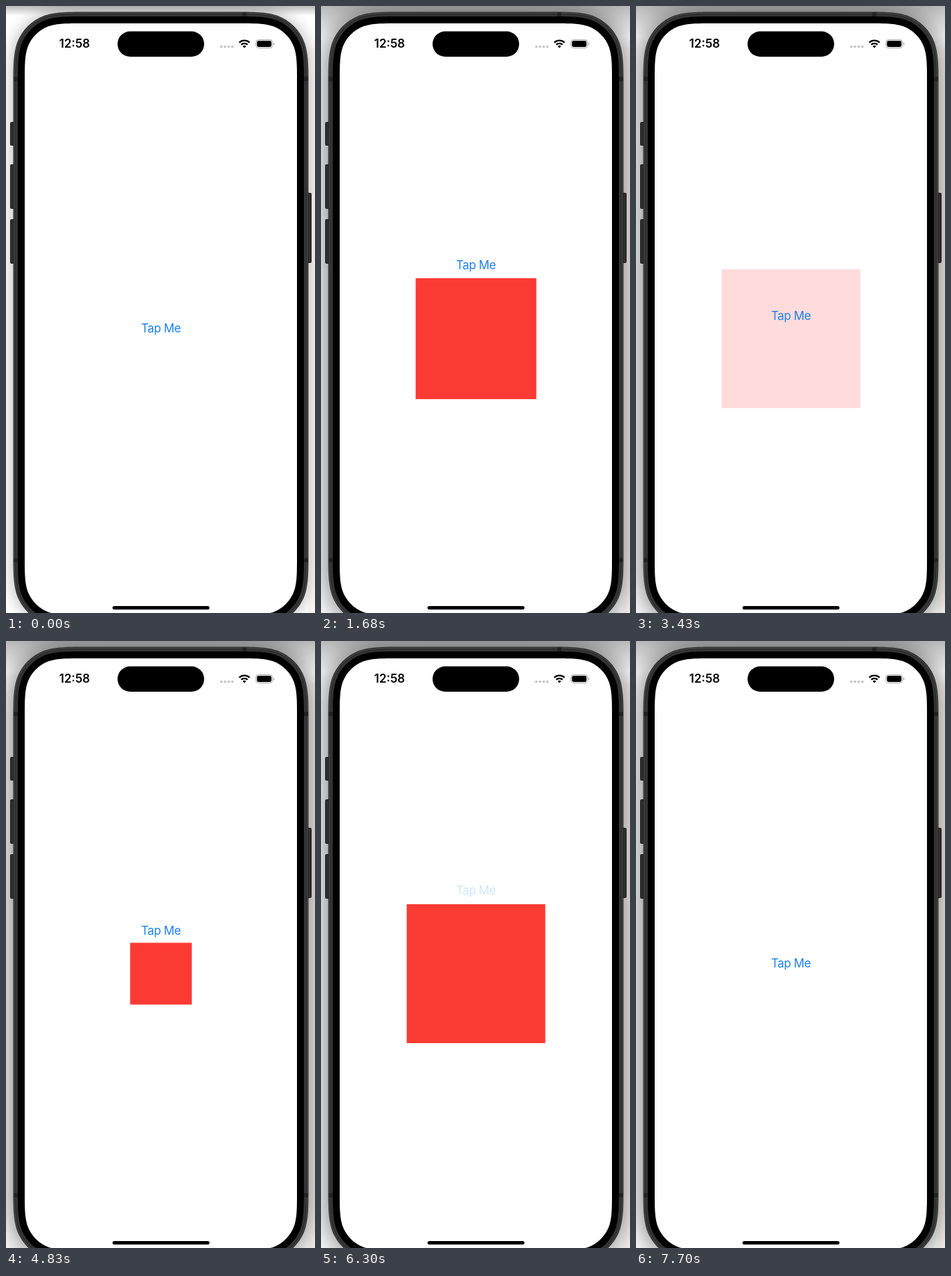
An HTML page for the animation above (8000 ms loop, 446 by 874 pixels).

```html
<!DOCTYPE html>
<html lang="en">
<head>
<meta charset="utf-8">
<title>Tap Me</title>
<style>
  html, body { margin: 0; width: 100%; height: 100%; overflow: hidden; background: #fff; }
  svg { display: block; width: 446px; height: 874px; }
  text { font-family: Inter, Roboto, sans-serif; font-size: 17px; text-anchor: middle; }
</style>
</head>
<body>
<svg viewBox="0 0 446 874">
  <defs>
    <filter id="soft" filterUnits="userSpaceOnUse" x="-100" y="-100" width="646" height="1120">
      <feGaussianBlur stdDeviation="12"/>
    </filter>
    <filter id="wide" filterUnits="userSpaceOnUse" x="-100" y="-100" width="646" height="1120">
      <feGaussianBlur stdDeviation="22"/>
    </filter>
    <linearGradient id="topShade" x2="0" y2="1">
      <stop offset="0" stop-color="#000" stop-opacity=".27"/>
      <stop offset="1" stop-color="#000" stop-opacity="0"/>
    </linearGradient>
  </defs>

  <rect width="446" height="874" fill="#fff"/>
  <g id="idleShade">
    <path data-inset="-16" opacity=".32" filter="url(#soft)"/>
    <rect width="446" height="14" fill="url(#topShade)"/>
  </g>
  <g id="focusShade">
    <path data-inset="-16" opacity=".6" filter="url(#wide)"/>
    <rect width="446" height="44" fill="url(#topShade)"/>
  </g>
  <rect x="436" y="60" width="10" height="814" fill="#c08f86" opacity=".07"/>

  <g id="buttons" fill="#303030" stroke="#161616"></g>

  <path data-inset="-16.5" fill="#1c1c1c"/>
  <path data-inset="-15" fill="#363636" stroke="#626262" stroke-width=".8"/>
  <path data-inset="-13.6" fill="#343434" stroke="#262626" stroke-width=".8"/>
  <g fill="#222">
    <rect x="11.5" y="102" width="6" height="6"/>
    <rect x="430" y="102" width="6" height="6"/>
    <rect x="11.5" y="795" width="6" height="6"/>
    <rect x="430" y="795" width="6" height="6"/>
    <rect x="341" y="9.5" width="6" height="6"/>
  </g>
  <path data-inset="-10"/>
  <path data-inset="0" fill="#fff"/>

  <text x="99" y="60.4" font-weight="600">12:58</text>
  <rect x="161" y="36.5" width="125" height="36.5" rx="18.25"/>
  <g fill="#c6c6c6">
    <circle cx="310.8" cy="58.6" r="1.9"/>
    <circle cx="316.1" cy="58.6" r="1.9"/>
    <circle cx="321.4" cy="58.6" r="1.9"/>
    <circle cx="326.7" cy="58.6" r="1.9"/>
  </g>
  <g fill="none" stroke="#000" stroke-width="2.3">
    <path d="M336.6 52.7A10.8 10.8 0 0 1 351.6 52.7"/>
    <path d="M339.5 55.7A6.7 6.7 0 0 1 348.7 55.7"/>
    <path d="M344.1 60.4L341.7 58A3.5 3.5 0 0 1 346.5 58Z" fill="#000" stroke="none"/>
  </g>
  <rect x="360.7" y="48.5" width="24" height="12" rx="3.8" fill="none" stroke="#a6a6a6"/>
  <rect x="362.2" y="50" width="21" height="9" rx="2.4"/>
  <path d="M386 52.5Q387.4 53 387.4 54.5T386 56.5Z" fill="#a6a6a6"/>

  <rect id="square" x="-100" y="-100" width="200" height="200" fill="#fc3a34"/>
  <text id="label" x="223.6" fill="#1f80ec" letter-spacing="-.4">Tap Me</text>
  <rect x="153.7" y="864" width="140" height="5" rx="2.5"/>
</svg>
<script>
const LOOP = 8000, FOCUS = 1260;
const REST_Y = 470, LIFT = 105;
const taps = [
  { press: 1260, release: 1369, show: true },
  { press: 3152, release: 3154, show: false },
  { press: 4620, release: 4699, show: true },
  { press: 6300, release: 6345, show: false }
];
const byId = id => document.getElementById(id);
const clamp = v => Math.max(0, Math.min(1, v));

// Screen outline grown by -inset, with continuous-curvature corners.
function outline(inset) {
  const x0 = 27 + inset, y0 = 25 + inset, x1 = 420 - inset, y1 = 877 - inset;
  const r = 55 - inset;
  const half = [[1.5287, 0], [1.0885, 0], [.8684, 0], [.6315, .0749], [.3728, .1691]];
  const corner = half.concat(half.map(([a, b]) => [b, a]).reverse());
  const place = (pts, fx, fy) => pts.map(([a, b]) =>
    `${fx ? x1 - a * r : x0 + a * r} ${fy ? y1 - b * r : y0 + b * r}`);
  const back = [...corner].reverse();
  return "M" + [place(back, 0, 0), place(corner, 1, 0), place(back, 1, 1), place(corner, 0, 1)]
    .map(p => `${p[0]}C${p.slice(1).join(" ")}`).join("L") + "Z";
}

document.querySelectorAll("[data-inset]").forEach(p =>
  p.setAttribute("d", outline(+p.dataset.inset)));

byId("buttons").innerHTML = [[6.5, 167.5, 33], [6.5, 228.5, 63], [6.5, 307.5, 63], [434.5, 269.5, 100]]
  .map(([x, y, h]) => `<rect x="${x}" y="${y}" width="6" height="${h}" rx="1"/>`).join("");

// Critically damped spring with a 0.55 s response.
function spring(ms) {
  const k = Math.max(0, ms) / 1000 * 2 * Math.PI / .55;
  return 1 - (1 + k) * Math.exp(-k);
}

function draw(t) {
  const tap = taps.filter(a => t >= a.press).pop();
  const since = tap ? t - tap.release : 0;
  const moved = tap ? spring(since) : 0;
  const open = !tap ? 0 : tap.show ? moved : 1 - moved;
  const scale = tap && !tap.show ? 1 : open;
  const fade = tap && !tap.show ? open : 1;

  byId("idleShade").style.display = t < FOCUS ? "" : "none";
  byId("focusShade").style.display = t < FOCUS ? "none" : "";
  byId("square").setAttribute("transform", `translate(223.7 479) scale(${scale})`);
  byId("square").setAttribute("opacity", fade);
  byId("label").setAttribute("y", REST_Y - LIFT * open);
  byId("label").setAttribute("opacity", tap ? .2 + .8 * clamp(since / 100) : 1);
}

const start = performance.now();
function tick() {
  draw((performance.now() - start) % LOOP);
  requestAnimationFrame(tick);
}
tick();
</script>
</body>
</html>
```
